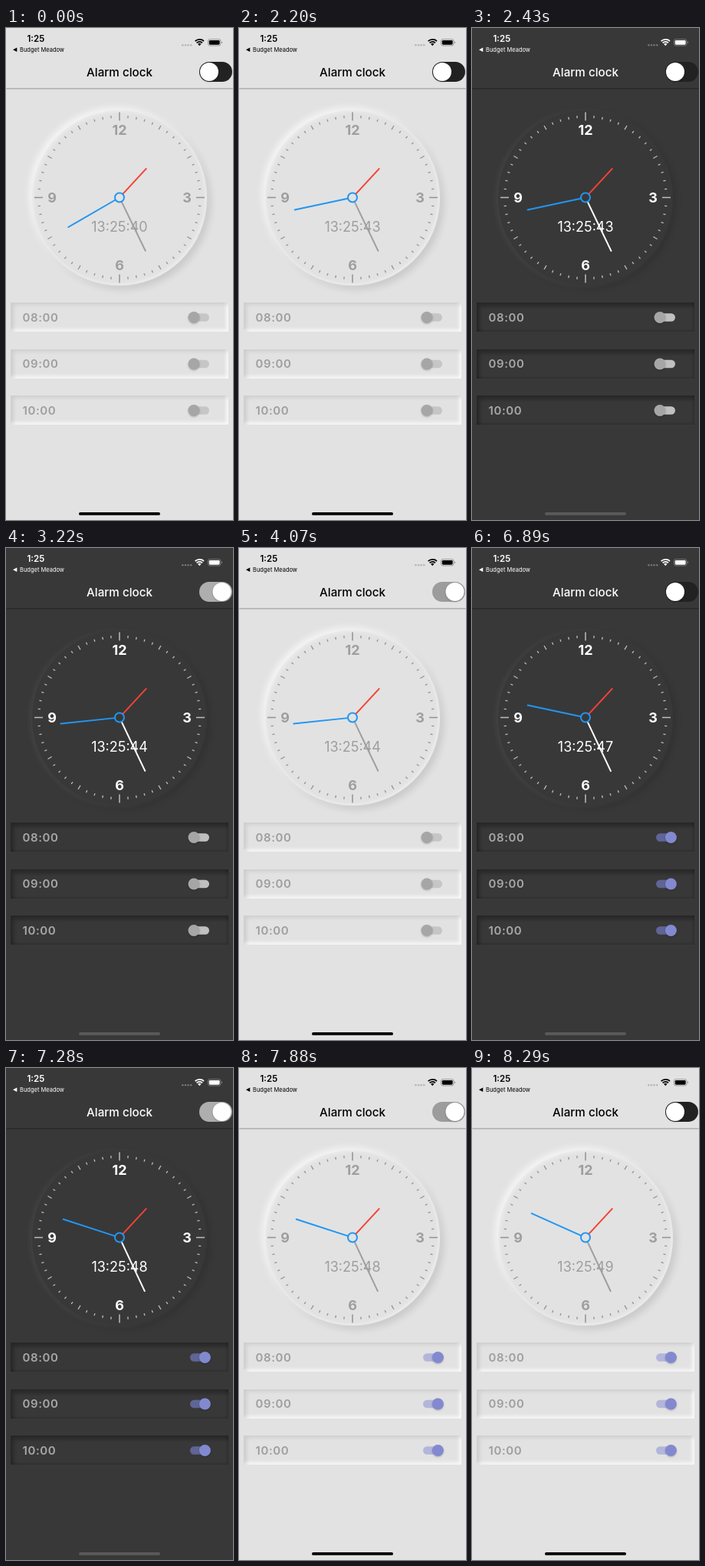
These frames come from a looping animation (296 by 640 pixels, 8.33 s). An HTML page:

```html
<!DOCTYPE html>
<html lang="en">
<head>
<meta charset="utf-8">
<title>Alarm clock</title>
<style>
  html, body { margin: 0; width: 100%; height: 100%; overflow: hidden; }
  #stage {
    --bg: #e2e2e2; --ink: #000; --dim: #9e9e9e; --tick: #929292; --num: #9e9e9e;
    --home: #000; --signal: #b4b4b4; --bar: 0 1px 2px rgba(0,0,0,.34);
    --dial: -4px -4px 8px rgba(255,255,255,.65), 5px 5px 10px rgba(0,0,0,.11),
      inset -2px -2px 4px rgba(255,255,255,.4), inset 2px 2px 4px rgba(255,255,255,.35);
    --card: inset 4px 3px 5px rgba(0,0,0,.09), inset -3px -3px 4px rgba(255,255,255,.75);
    position: relative; width: 296px; height: 640px; overflow: hidden; background: var(--bg);
  }
  #stage.dark {
    --bg: #383838; --ink: #fff; --dim: #a8a8a8; --tick: #bdbdbd; --num: #fff;
    --home: #5a5a5a; --signal: #777; --bar: 0 1px 2px rgba(0,0,0,.4);
    --dial: -3px 1px 7px rgba(255,255,255,.07), 4px 4px 9px rgba(0,0,0,.13);
    --card: inset 4px 5px 5px rgba(0,0,0,.3), inset -2px -2px 3px rgba(0,0,0,.14);
  }
  #stage > * { position: absolute; }
  .bar { left: 0; top: 0; width: 296px; height: 78px; background: var(--bg); box-shadow: var(--bar); }
  .dial { left: 34px; top: 106.5px; width: 228px; height: 228px; border-radius: 50%; background: var(--bg); box-shadow: var(--dial); }
  .card { left: 6px; width: 284px; height: 38px; box-shadow: var(--card); }
  svg { left: 0; top: 0; font-family: Inter, "Liberation Sans", sans-serif; }
  .ink { fill: var(--ink); }
  .num { fill: var(--num); text-anchor: middle; }
  .dim { fill: var(--dim); }
  .tick { stroke: var(--tick); }
  .knob { filter: drop-shadow(0 1px 1px rgba(0,0,0,.22)); }
</style>
</head>
<body>
<div id="stage">
  <div class="bar"></div>
  <div class="dial"></div>
  <svg id="art" width="296" height="640" viewBox="0 0 296 640">
    <g class="ink">
      <text x="27.5" y="17.6" font-size="11.5" font-weight="600">1:25</text>
      <path d="M9 28.2 14.3 25.4V31z"/>
      <text x="18" y="31" font-size="7.5">Budget Meadow</text>
      <text x="148" y="62.6" font-size="15.2" font-weight="500" text-anchor="middle">Alarm clock</text>
      <path d="M252.3 23.2 250.1 20.8a3.2 3.2 0 0 1 4.4 0z"/>
      <g fill="none" stroke="var(--ink)" stroke-width="1.7">
        <path d="M248.6 19.3a5.3 5.3 0 0 1 7.4 0M246.6 17.1a8.2 8.2 0 0 1 11.4 0"/>
        <rect x="263.5" y="14.6" width="16.4" height="8.4" rx="2.4" stroke-width=".8" opacity=".4"/>
      </g>
      <rect x="264.8" y="15.9" width="13.8" height="5.8" rx="1.4"/>
      <path d="M281 17.4v2.8a1.5 1.5 0 0 0 0-2.8z" opacity=".45"/>
    </g>
    <g id="signal" style="fill:var(--signal)"></g>
    <g id="theme">
      <rect x="252" y="44" width="43" height="26" rx="13"/>
      <circle class="knob" cy="57" r="12" fill="#fff"/>
    </g>
    <g id="ticks" class="tick"></g>
    <g id="numbers" class="num" font-size="18" font-weight="700"></g>
    <text id="digital" class="num" x="148" y="265" font-size="18"></text>
    <g id="hands" fill="none" stroke-width="2" stroke-linecap="round">
      <line id="hour" stroke="#f44336"/>
      <line id="minute" stroke="var(--num)"/>
      <line id="second" stroke="#2196f3"/>
      <circle cx="148" cy="220.5" r="6" stroke="#2196f3" style="fill:var(--bg)"/>
    </g>
    <g id="alarms"></g>
    <rect x="95" y="630" width="106" height="3.8" rx="1.9" style="fill:var(--home)"/>
  </svg>
</div>
<script>
const LOOP = 8330, CX = 148, CY = 220.5;
const $ = id => document.getElementById(id);
const stage = $('stage');

// Pairs of [start time, value]; values hold until the next start.
const SECONDS = [[0, 40], [200, 41], [1200, 42], [2200, 43], [3220, 44], [4210, 45], [6260, 47], [7280, 48], [8290, 49]];
const DARK = [[0, 0], [2430, 1], [4070, 0], [6890, 1], [7880, 0]];
const THEME = [[0, 0], [2550, .6], [2670, 1], [4210, .4], [4320, 0], [7010, .6], [7120, 1], [7990, .05], [8290, 0]];
const ALARM = [[0, 0], [5100, .5], [5230, 1]];

const held = (steps, t) => steps.reduce((v, [start, value]) => t >= start ? value : v, 0);
const mix = (a, b, p) => `rgb(${a.map((v, i) => Math.round(v + (b[i] - v) * p))})`;
const gray = v => [v, v, v];

function add(parent, tag, attrs, text = '') {
  const el = document.createElementNS('http://www.w3.org/2000/svg', tag);
  for (const key in attrs) el.setAttribute(key, attrs[key]);
  el.textContent = text;
  return parent.appendChild(el);
}

function set(el, attrs) {
  for (const key in attrs) el.setAttribute(key, attrs[key]);
}

// A radial line at an angle in degrees, clockwise from twelve.
function radial(angle, from, to) {
  const a = angle * Math.PI / 180, s = Math.sin(a), c = Math.cos(a);
  return { x1: CX + s * from, y1: CY - c * from, x2: CX + s * to, y2: CY - c * to };
}

for (let i = 0; i < 4; i++) add($('signal'), 'circle', { cx: 230.4 + i * 3.6, cy: 22.2, r: 1.2 });

for (let i = 0; i < 60; i++) {
  const [from, to] = i % 15 === 0 ? [100, 111] : i % 5 === 0 ? [102, 108] : [103.7, 106.9];
  add($('ticks'), 'line', { ...radial(i * 6, from, to), 'stroke-width': i % 15 ? 1.3 : 1.5 });
}

[[12, 148, 138.8], [3, 236, 227], [6, 148, 315.3], [9, 60, 227]]
  .forEach(([n, x, y]) => add($('numbers'), 'text', { x, y }, n));

const switches = ['08:00', '09:00', '10:00'].map((label, i) => {
  const y = 376.5 + i * 60.5;
  const card = document.createElement('div');
  card.className = 'card';
  card.style.top = y - 19.3 + 'px';
  stage.insertBefore(card, $('art'));
  add($('alarms'), 'text', { class: 'dim', x: 21.5, y: y + 5.4, 'font-size': 15, 'font-weight': 600, 'letter-spacing': .6 }, label);
  return {
    track: add($('alarms'), 'rect', { x: 240, y: y - 5.2, width: 25, height: 10.4, rx: 5.2 }),
    knob: add($('alarms'), 'circle', { class: 'knob', cy: y, r: 7.5 })
  };
});

function draw(t) {
  const dark = held(DARK, t), sec = held(SECONDS, t);
  stage.classList.toggle('dark', !!dark);

  const p = held(THEME, t), [track, knob] = $('theme').children;
  set(track, { fill: mix(gray(34), gray(dark ? 174 : 156), p) });
  set(knob, { cx: 265 + 16.5 * p });

  const on = held(ALARM, t);
  for (const s of switches) {
    set(s.track, { fill: mix(gray(dark ? 192 : 198), dark ? [95, 101, 150] : [179, 182, 218], on) });
    set(s.knob, { cx: 245 + 14.4 * on, fill: mix(gray(166), [130, 137, 207], on) });
  }

  const min = 25 + sec / 60;
  set($('hour'), radial((1 + min / 60) * 30, 6, 51));
  set($('minute'), radial(min * 6, 6, 77));
  set($('second'), radial(sec * 6, 6, 77));
  $('digital').textContent = '13:25:' + sec;
}

const begin = performance.now();
function frame() {
  draw((performance.now() - begin) % LOOP);
  requestAnimationFrame(frame);
}
frame();
</script>
</body>
</html>
```
